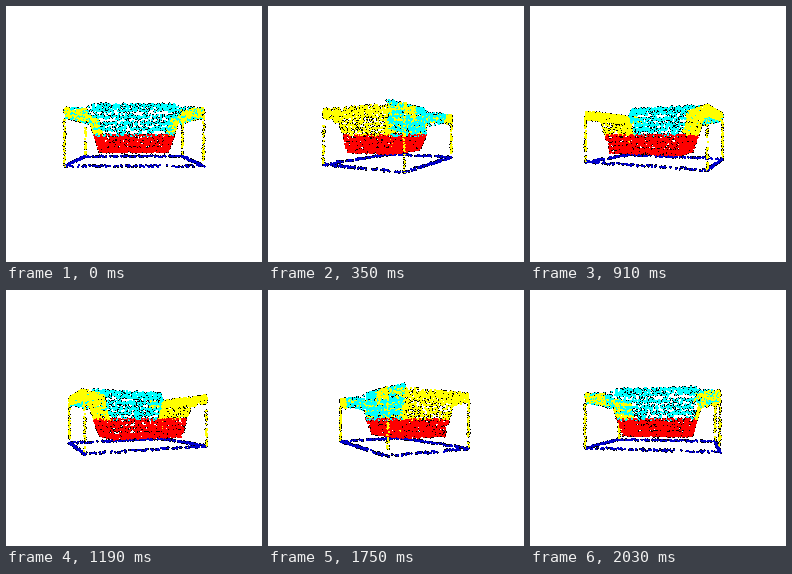
Write a matplotlib script that moves like this. It is 256 px wide and 256 px high and loops after 2.1 s.

```python
import numpy as np
import matplotlib.pyplot as plt
from matplotlib.animation import FuncAnimation

SIZE, FRAMES, INTERVAL = 256, 30, 70
FOCAL = SIZE / 2 * np.sqrt(3)  # 60 degree field of view, camera distance 1
A, B, FLOOR = 0.2577, 0.178, -0.1186  # half width, half depth, base height

BLUE, YELLOW = (0, 0, 205), (255, 255, 0)
CYAN, RED = (0, 255, 255), (255, 0, 0)

rng = np.random.default_rng(7)
clouds, tints = [], []


def add(points, color, jitter=0.002):
    clouds.append(points + rng.uniform(-jitter, jitter, points.shape))
    tints.append(np.tile(color, (len(points), 1)))


def line(n, color, p, q, jitter=0.004):
    t = rng.random((n, 1))
    add(np.array(p) * (1 - t) + np.array(q) * t, color, jitter)


def quad(n, color, p, q, r, s, rows=0, jitter=0.002):
    """Scatter points over the patch p-q-r-s; rows pulls most onto slats."""
    u, v = rng.random((2, n, 1))
    if rows:
        slat = rng.random((n, 1)) < 0.55
        v = np.where(slat, np.round(v * rows) / rows, v)
    p, q, r, s = map(np.array, (p, q, r, s))
    add((p * (1 - u) + q * u) * (1 - v) + (s * (1 - u) + r * u) * v,
        color, jitter)


def build_base():
    for s in (-1, 1):
        line(95, BLUE, (-A, FLOOR, s * B), (A, FLOOR, s * B))
        line(75, BLUE, (s * A, FLOOR, -B), (s * A, FLOOR, B))
        for t in (-1, 1):
            line(42, YELLOW, (s * A, FLOOR, t * B), (s * A, 0.09, t * B), 0.003)


def build_seat():
    top, low = -0.005, -0.077
    w, wl = 0.166, 0.148
    back, front, back_l, front_l = -0.076, 0.164, -0.052, 0.156
    quad(330, RED, (-wl, low, back_l), (wl, low, back_l),
         (w, top, back), (-w, top, back), rows=4)
    quad(330, RED, (-wl, low, front_l), (wl, low, front_l),
         (w, top, front), (-w, top, front), rows=4)
    for s in (-1, 1):
        quad(260, RED, (s * wl, low, back_l), (s * wl, low, front_l),
             (s * w, top, front), (s * w, top, back), rows=4)
    quad(260, RED, (-wl, low, back_l), (wl, low, back_l),
         (wl, low, front_l), (-wl, low, front_l))


def build_back():
    quad(620, CYAN, (-0.166, -0.005, -0.074), (0.166, -0.005, -0.074),
         (0.181, 0.124, -0.066), (-0.181, 0.124, -0.066), rows=5, jitter=0.005)
    quad(130, CYAN, (-0.18, 0.105, -0.07), (0.18, 0.105, -0.07),
         (0.181, 0.127, -0.062), (-0.181, 0.127, -0.062))
    for s in (-1, 1):
        quad(120, CYAN, (s * 0.175, 0.04, -0.066), (s * A, 0.06, -B + 0.004),
             (s * A, 0.097, -B + 0.004), (s * 0.181, 0.115, -0.066))


def build_arms():
    for s in (-1, 1):
        # flared side wall, then the flange reaching out to the legs
        quad(330, YELLOW, (s * 0.166, -0.005, -0.07), (s * 0.166, -0.005, 0.164),
             (s * 0.195, 0.078, 0.17), (s * 0.195, 0.078, -0.08), rows=6)
        quad(190, YELLOW, (s * 0.195, 0.078, -0.10), (s * 0.195, 0.078, 0.172),
             (s * A, 0.093, B), (s * A, 0.093, -B))
        quad(210, YELLOW, (s * A, 0.062, -B), (s * A, 0.062, B),
             (s * A, 0.097, B), (s * A, 0.097, -B), rows=2)
        quad(85, YELLOW, (s * 0.168, 0.045, -B), (s * A, 0.064, -B),
             (s * A, 0.097, -B), (s * 0.175, 0.093, -B))
        quad(70, YELLOW, (s * 0.18, 0.045, B - 0.004), (s * A, 0.064, B),
             (s * A, 0.095, B), (s * 0.19, 0.085, B - 0.004))


build_base()
build_seat()
build_back()
build_arms()
cloud, tint = np.vstack(clouds), np.vstack(tints).astype(np.uint8)
OFFSETS = np.array([(i, j) for j in range(-2, 3) for i in range(-2, 3)])


def render(angle):
    c, s = np.cos(angle), np.sin(angle)
    x, y, z = cloud.T
    depth = 1 + x * s + z * c
    pos = SIZE / 2 + FOCAL * np.column_stack((x * c - z * s, -y)) / depth[:, None]
    order = np.argsort(-depth)
    pos, colors = pos[order], tint[order]

    cells = np.floor(pos).astype(int)[:, None] + OFFSETS
    dist = np.hypot(*np.moveaxis(cells + 0.5 - pos[:, None], 2, 0))
    img = np.full((SIZE, SIZE, 3), 255, np.uint8)
    # dark halo first, so only loose points keep a black edge
    halo = cells[dist < 1.3]
    img[halo[:, 1], halo[:, 0]] = 0
    core = dist < 0.98
    dots = cells[core]
    img[dots[:, 1], dots[:, 0]] = np.repeat(colors, core.sum(axis=1), axis=0)
    return img


fig = plt.figure(figsize=(2.56, 2.56), dpi=100, facecolor="white")
ax = fig.add_axes([0, 0, 1, 1])
ax.axis("off")
view = ax.imshow(render(0), interpolation="nearest", aspect="auto")


def update(i):
    view.set_data(render(2 * np.pi * i / FRAMES))
    return (view,)


anim = FuncAnimation(fig, update, frames=FRAMES, interval=INTERVAL,
                     repeat=True, repeat_delay=0)
plt.show()
```
